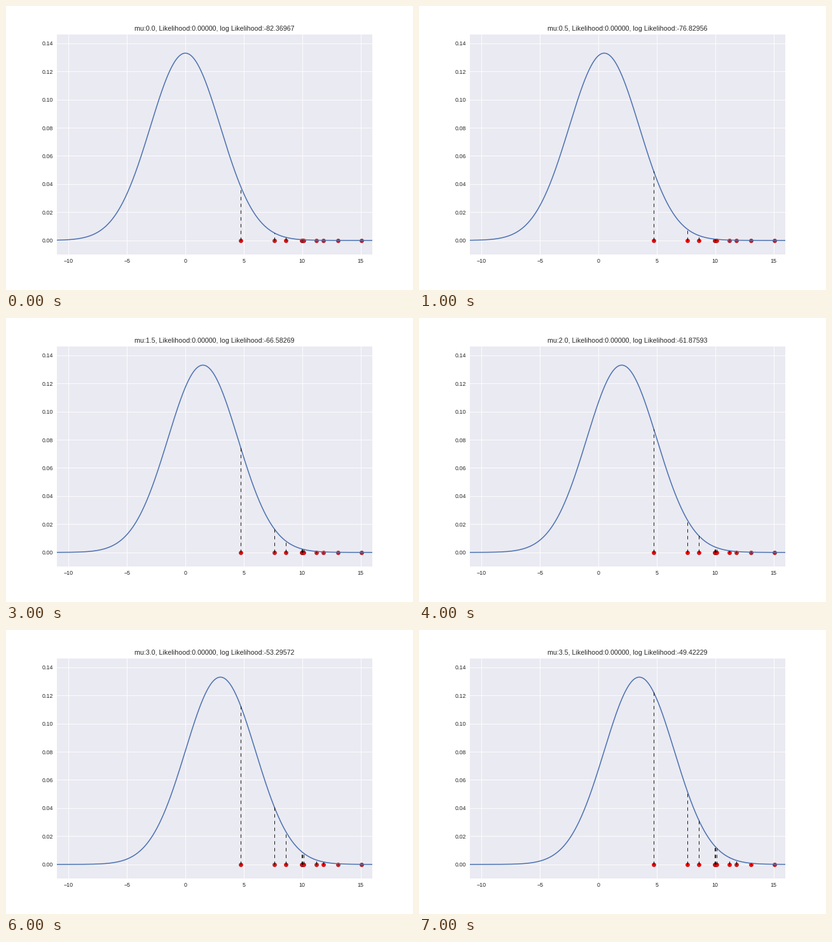
A matplotlib script for the animation above (8000 ms loop, 640 px wide and 448 px high).

```python
import numpy as np
import matplotlib.pyplot as plt
from matplotlib.animation import FuncAnimation

plt.rcParams["font.family"] = "Liberation Sans"

SIGMA = 3
STEP = 0.5
FRAMES = 8
INK = "0.15"
POINTS = [4.73, 7.61, 8.59, 9.98, 10.0, 10.12, 11.2, 11.8, 13.05, 15.06]
PEAK = 1 / (SIGMA * np.sqrt(2 * np.pi))


def pdf(x, mu):
    return PEAK * np.exp(-((x - mu) / SIGMA) ** 2 / 2)


def log_likelihood(mu):
    # Quadratic in mu; coefficients come from the unrounded sample.
    return -82.3696665 + 11.3579815 * mu - len(POINTS) * mu**2 / (2 * SIGMA**2)


fig = plt.figure(figsize=(10, 7), dpi=64, facecolor="white")
ax = fig.add_axes([0.125, 0.125, 0.775, 0.775], facecolor="#EAEAF2")
ax.set_xlim(-11, 16)
ax.set_ylim(-0.01, PEAK * 1.1)
ax.set_xticks(range(-10, 16, 5))
ax.set_yticks(np.arange(8) * 0.02)
ax.yaxis.set_major_formatter("{x:.2f}")
ax.tick_params(length=0, pad=7, labelsize=10, labelcolor=INK)
ax.set_axisbelow(True)
ax.grid(color="white", linewidth=1, linestyle="-")
ax.spines[:].set_visible(False)

xs = np.linspace(-11, 16, 500)
ax.scatter(POINTS, [0] * len(POINTS), s=50, c="red",
           edgecolors="black", linewidths=0.3, zorder=1)
curve, = ax.plot(xs, pdf(xs, 0), color="#4C72B0", linewidth=1.75)
stems = [ax.plot([x, x], [0, 0], color="black", linewidth=1,
                 linestyle=(0, (6, 6)), dash_capstyle="butt")[0]
         for x in POINTS]
title = ax.set_title("", fontsize=12, color=INK, pad=6)


def draw(i):
    mu = i * STEP
    ll = log_likelihood(mu)
    curve.set_ydata(pdf(xs, mu))
    for x, stem in zip(POINTS, stems):
        stem.set_ydata([0, pdf(x, mu)])
    title.set_text(f"mu:{mu:.1f}, Likelihood:{np.exp(ll):.5f}, "
                   f"log Likelihood:{ll:.5f}")
    return [curve, title, *stems]


anim = FuncAnimation(fig, draw, frames=FRAMES, interval=1000,
                     repeat=True, repeat_delay=0, blit=False)
plt.show()
```
